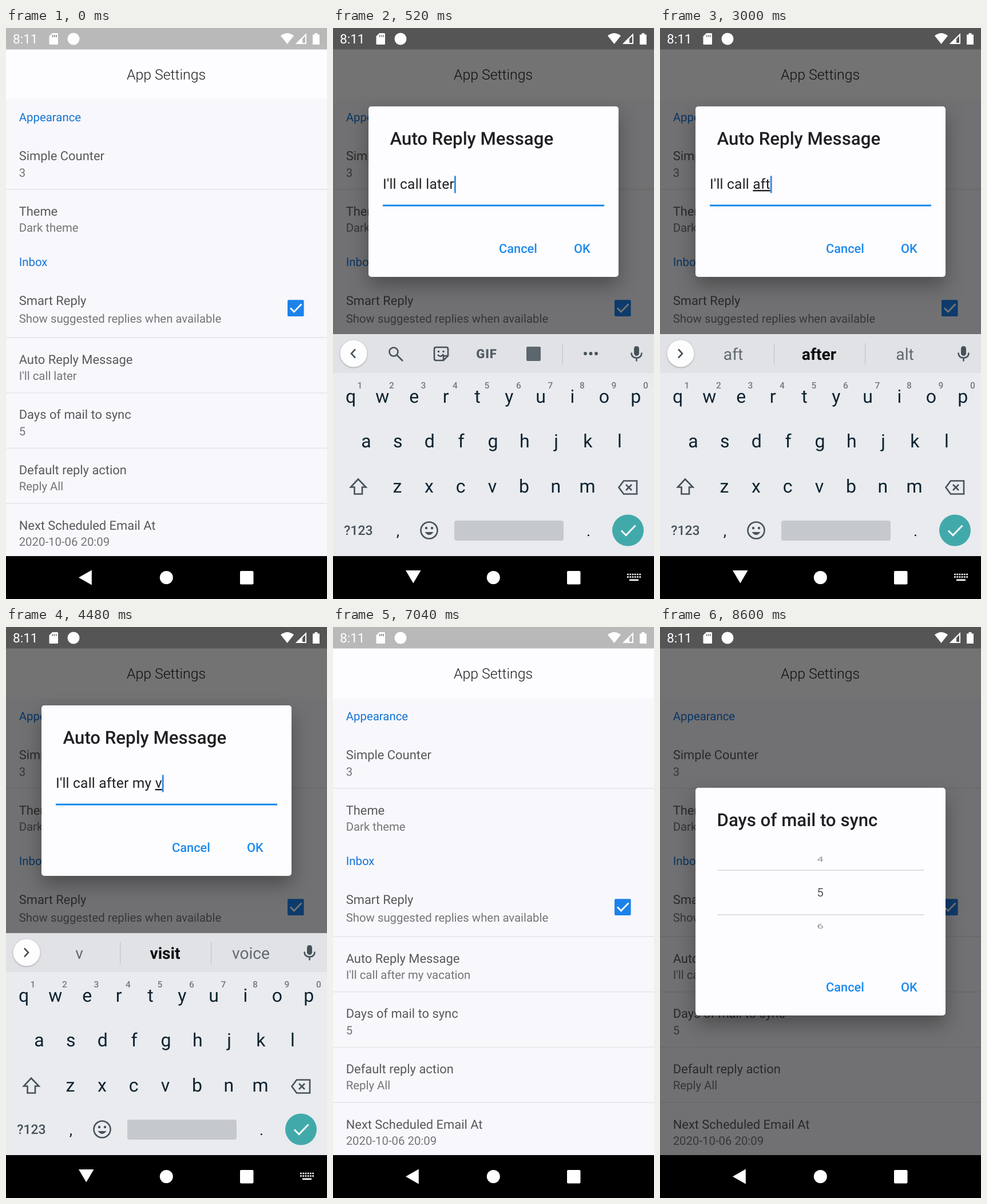
An HTML page that plays this animation: 561 px wide and 998 px high, repeating every 9.4 s.

```html
<!DOCTYPE html>
<html lang="en">
<head>
<meta charset="utf-8">
<title>App settings</title>
<style>
  html, body { margin: 0; width: 100%; height: 100%; overflow: hidden; background: #000; }
  svg { display: block; font-family: Roboto, sans-serif; text-rendering: geometricPrecision; }
  text { white-space: pre; }
  .mid { text-anchor: middle; }
  .head { font-size: 20.4px; fill: #1674d6; }
  .name { font-size: 21.9px; fill: #59585c; }
  .value { font-size: 20.35px; fill: #757478; }
  .title { font-size: 31.2px; font-weight: 500; fill: #202022; }
  .button { font-size: 21.8px; font-weight: 500; fill: #1c8aec; }
  .card { fill: #fdfcfe; filter: drop-shadow(0 15px 17px rgba(0,0,0,.32)); }
  .key { font-size: 32px; fill: #0d2230; text-anchor: middle; }
  .digit { font-size: 15.5px; font-weight: 500; fill: #737a7f; text-anchor: middle; }
  .word { font-size: 28.2px; text-anchor: middle; }
  .line { fill: none; stroke: #46525a; stroke-width: 2.6; }
</style>
</head>
<body>
<svg id="stage" width="561" height="998" viewBox="0 0 561 998"></svg>
<script>
const LOOP = 9400, TICK = 40;
const MARGIN = 22.7, FIELD_X = 87, WORD_LIMIT = 122;

// time, field text, three suggestions (* marks the bold one)
const typing = [
  [0, "I'll call later", "later late lateral"],
  [1960, "I'll call late", "late later lately"],
  [2080, "I'll call lat", "lat *late last"],
  [2200, "I'll call la", "la *last late"],
  [2320, "I'll call l", "l later last"],
  [2440, "I'll call ", "you back me"],
  [2720, "I'll call a", "about a again"],
  [2920, "I'll call af", "af *after aft"],
  [3000, "I'll call aft", "aft *after alt"],
  [3320, "I'll call afte", "afte *after afternoon"],
  [3440, "I'll call after", "after afters afternoon"],
  [3520, "I'll call after ", "work the I"],
  [3800, "I'll call after m", "m *my I"],
  [3960, "I'll call after my", "my mg may"],
  [4080, "I'll call after my ", "interview phone meeting"],
  [4480, "I'll call after my v", "v *visit voice"],
  [4600, "I'll call after my va", "va van vacation"],
  [4960, "I'll call after my vac", "vac *vacation vacancy"],
  [5040, "I'll call after my vaca", "vaca *vacation vacancy"],
  [5280, "I'll call after my vacat", "vacat *vacation vacated"],
  [5360, "I'll call after my vacati", "vacati *vacation vacating"],
  [5440, "I'll call after my vacatio", "vacatio *vacation vacating"],
  [5640, "I'll call after my vacation", "vacation vacations vacationing"]
];

const text = (x, y, cls, s, extra = "") => `<text x="${x}" y="${y}" class="${cls}" ${extra}>${s}</text>`;
const rect = (x, y, w, h, fill, r = 0) => `<rect x="${x}" y="${y}" width="${w}" height="${h}" rx="${r}" fill="${fill}"/>`;
const circle = (x, y, r, fill, extra = "") => `<circle cx="${x}" cy="${y}" r="${r}" fill="${fill}" ${extra}/>`;
const path = (d, attrs) => `<path d="${d}" ${attrs}/>`;
const group = (id, body, attrs = "") => `<g id="${id}" ${attrs}>${body}</g>`;
const row = (y, name, value, gap = 28.5, id = "") =>
  text(MARGIN, y, "name", name) + text(MARGIN, y + gap, "value", value, id && `id="${id}"`);

const statusBar = rect(0, 0, 561, 37.5, "#bab9ba");
const statusIcons =
  text(12, 27, "", "8:11", 'font-size="22.6" fill="#fff"') +
  path("M81 9H89.5Q91 9 91 10.5V27.5Q91 29 89.5 29H77Q75.5 29 75.5 27.5V14.5Z", 'fill="#fff"') +
  path("M81.5 12V16M84.7 12V16M88 12V16", 'stroke="#888" stroke-width="1.7"') +
  circle(118, 19, 10.5, "#fff") +
  path("M480 13.5Q491.5 4.5 503 13.5L491.5 28Z", 'fill="#fff"') +
  path("M524 11.5V27H508.5Z", 'fill="none" stroke="#fff" stroke-width="2"') +
  path("M506 28L518 16V28Z", 'fill="#fff"') +
  path("M536 11.5H539.5V9H544.5V11.5H548V29H536Z", 'fill="#fff"');

const settings =
  rect(0, 0, 561, 923, "#f8f7fb") + rect(0, 37.5, 561, 87, "#fdfcfe") + statusBar +
  text(280, 90, "mid", "App Settings", 'font-size="24.8" font-weight="300" fill="#1f1f21"') +
  text(MARGIN, 163, "head", "Appearance") + text(MARGIN, 415.5, "head", "Inbox") +
  row(231, "Simple Counter", "3") + row(327.7, "Theme", "Dark theme") +
  row(483.5, "Smart Reply", "Show suggested replies when available", 31) +
  row(586.5, "Auto Reply Message", "", 28.5, "reply") +
  row(683.2, "Days of mail to sync", "5") + row(779.9, "Default reply action", "Reply All") +
  row(876.6, "Next Scheduled Email At", "2020-10-06 20:09") +
  [281, 540, 636.7, 733.4, 830].map(y => rect(0, y, 561, 2, "#e9e8eb")).join("") +
  rect(492, 475.3, 28.6, 28.6, "#1c82ea", 2) +
  path("M497 489.500L503.500 496L516.500 482.500", 'fill="none" stroke="#fff" stroke-width="2.800"');

const card = (y, h, title) =>
  `<rect class="card" x="62" y="${y}" width="437" height="${h}" rx="5"/>` + text(99.5, y + 66.5, "title", title);
const buttons = y => text(290, y, "button", "Cancel") + text(421, y, "button", "OK");

const replyDialog =
  card(137, 298, "Auto Reply Message") +
  `<text id="field" x="${FIELD_X}" y="281" font-size="24.55" letter-spacing=".205" fill="#202022"><tspan id="done"></tspan><tspan id="composing"></tspan></text>` +
  rect(FIELD_X, 309.5, 387, 1.4, "#858487") +
  group("focus", rect(FIELD_X, 308.7, 387, 3, "#1688ec")) +
  group("cursor", rect(0, 258.5, 2.8, 30, "#3488dc")) +
  group("handle", path("M211 287L223 299A17 17 0 1 1 199 299Z", 'fill="#5cb0f7"')) +
  group("tap", circle(437, 394, 9, "#d9e6ec")) + buttons(393);

const flatNumber = (y, n) =>
  text(0, 0, "mid", n, `transform="translate(280 ${y}) scale(1 .58)" font-size="20.45" fill="#929195"`);
const daysDialog =
  card(281, 398, "Days of mail to sync") + flatNumber(409.5, 4) + flatNumber(526.5, 6) +
  text(280, 471, "mid", "5", 'font-size="20.45" fill="#555458"') +
  rect(100, 424, 361, 2, "#dfdee1") + rect(100, 502, 361, 2, "#dfdee1") + buttons(637);

const keyRow = (letters, x, y) => [...letters].map((c, i) => text(x + i * 55.35, y, "key", c)).join("");
const divider = x => rect(x, 551, 1.3, 37, "#c3c6ca");
const stroke = 'class="line"';

const toolbar =
  path("M39 561.5L32 569L39 576.5", stroke) +
  `<circle class="line" cx="106" cy="566" r="7.5"/>` + path("M111.5 571.5L122 582", stroke) +
  path("M180 558H198Q201 558 201 561V573L193 581H180Q177 581 177 578V561Q177 558 180 558ZM193 581V573H201M183 571Q188 577 193 570", stroke) +
  circle(184.5, 565.5, 1.8, "#46525a") + circle(193, 565.5, 1.8, "#46525a") +
  text(268.5, 577, "mid", "GIF", 'font-size="22" font-weight="900" letter-spacing="1" fill="#525d65"') +
  rect(338, 557, 25, 25, "#5c666d", 2) + divider(400.5) +
  [441, 450.5, 460].map(x => circle(x, 569, 2.9, "#46525a")).join("");
const suggestions =
  path("M32 561.5L39 569L32 576.5", stroke) + divider(199) + divider(358) +
  [128, 278, 428].map(x => `<g transform="translate(${x} 580)"><text class="word"></text></g>`).join("");

const keyboard =
  rect(0, 535, 561, 388, "#e9ebee") + rect(0, 535, 561, 68, "#e0e2e5") +
  circle(36, 569, 23.5, "#fdfdfe", 'style="filter:drop-shadow(0 1px 1.5px rgba(0,0,0,.3))"') +
  group("toolbar", toolbar) + group("suggestions", suggestions) +
  rect(526, 556, 9, 17, "#46525a", 4.5) +
  path("M521.5 567.5Q521.5 576.5 530.5 576.5Q539.5 576.5 539.5 567.5M530.5 576.5V582.5", stroke) +
  keyRow("qwertyuiop", 31, 654.5) + keyRow("asdfghjkl", 58, 732.5) + keyRow("zxcvbnm", 112.5, 811.5) +
  [..."1234567890"].map((c, i) => text(47 + i * 55.5, 630, "digit", c)).join("") +
  path("M44 788.5L57.5 802.5H51V814.5H37.5V802.5H31Z", stroke) +
  path("M508 791.5H531V814.5H508L499.5 803ZM512 798L522 808M522 798L512 808", stroke) +
  text(44.5, 886, "mid", "?123", 'font-size="23" font-weight="500" fill="#46525a"') +
  text(113.5, 888, "key", ",", 'style="font-size:27px"') + text(446.5, 888, "key", ".", 'style="font-size:27px"') +
  `<circle class="line" cx="168" cy="878" r="14.5"/>` +
  circle(163, 874, 2.2, "#46525a") + circle(173, 874, 2.2, "#46525a") +
  path("M160.5 881Q168 891 175.5 881Z", 'fill="#46525a"') +
  rect(212, 861, 191, 35, "#c5c8cd", 4) + circle(515.5, 878, 27.5, "#42a9ab") +
  path("M504 878.5L512 886.5L528.5 869.5", 'fill="none" stroke="#fff" stroke-width="3"');

const navIcons =
  path("", 'id="back" fill="#fff"') + circle(280.3, 960.5, 11.5, "#fff") + rect(409, 949, 23.5, 23.5, "#fff", 2) +
  group("keys", path("M514 955H538M514 959.5H538", 'stroke="#fff" stroke-width="2.5" stroke-dasharray="2.8 1.44"') +
    rect(518, 963.5, 16, 2.7, "#fff"));

document.getElementById("stage").innerHTML =
  settings + group("scrim", rect(0, 0, 561, 923, "#000")) + statusIcons +
  group("replyDialog", replyDialog) + group("daysDialog", daysDialog) +
  rect(0, 923, 561, 75, "#000") + group("keyboard", keyboard) + navIcons;

const $ = id => document.getElementById(id);
const words = [...document.querySelectorAll(".word")];
const ramp = (t, start, length) => Math.min(1, Math.max(0, (t - start) / length));
const easeOut = x => 1 - (1 - x) ** 2;
const fade = (id, alpha) => $(id).setAttribute("opacity", alpha);
const shift = (id, x, y) => $(id).setAttribute("transform", `translate(${x} ${y})`);

function showTyping(t) {
  const [, typed, offered] = typing.findLast(step => step[0] <= t);
  const wordStart = typed.lastIndexOf(" ") + 1;
  $("done").textContent = typed.slice(0, wordStart);
  $("composing").textContent = typed.slice(wordStart);
  $("composing").style.textDecoration = t >= 600 ? "underline" : "none";
  shift("cursor", FIELD_X + $("field").getComputedTextLength(), 0);
  offered.split(" ").forEach((word, i) => {
    const bold = word[0] === "*", el = words[i];
    el.textContent = word.replace("*", "");
    el.setAttribute("font-weight", bold ? 700 : 400);
    el.setAttribute("fill", bold ? "#0b0d0f" : "#626a6f");
    // Long words are condensed to their slot.
    el.setAttribute("transform", `scale(${Math.min(1, WORD_LIMIT / el.getComputedTextLength())} 1)`);
  });
}

function draw(t) {
  const within = (a, b) => t >= a && t < b;
  const closing = easeOut(ramp(t, 6860, 150));
  const reply = easeOut(ramp(t, 180, 150)) - closing;
  const days = easeOut(ramp(t, 8490, 110));
  const board = ramp(t, 196, 120) - ramp(t, 6860, 150);

  showTyping(t);
  $("reply").textContent = t < 6860 ? "I'll call later" : "I'll call after my vacation";
  fade("scrim", 0.54 * Math.max(easeOut(ramp(t, 150, 150)) - closing, days));
  fade("replyDialog", reply);
  fade("daysDialog", days);
  shift("replyDialog", 0, 194 * (1 - easeOut(ramp(t, 300, 160))));

  const spread = easeOut(ramp(t, 300, 200));
  $("focus").setAttribute("transform", `translate(280.5 0) scale(${spread} 1) translate(-280.5 0)`);
  fade("cursor", within(1080, 1560) || within(6120, 6640) ? 0 : 1);
  fade("handle", within(1560, 1960) ? 1 : 0);
  fade("tap", within(6680, 6880) ? 1 : 0);

  fade("keyboard", board);
  shift("keyboard", 0, 130 * (1 - board));
  fade("toolbar", t < 600 ? 1 : 0);
  fade("suggestions", t < 600 ? 0 : 1);

  $("back").setAttribute("d", within(240, 6960) ? "M127 948H153.5L140.300 970.5Z" : "M127 960.5L149.800 947.500V973.500Z");
  fade("keys", within(240, 6840) ? 1 : 0);
}

const start = performance.now();
function loop() {
  const t = (performance.now() - start) % LOOP;
  draw(Math.floor(t / TICK) * TICK);
  requestAnimationFrame(loop);
}
loop();
</script>
</body>
</html>
```
